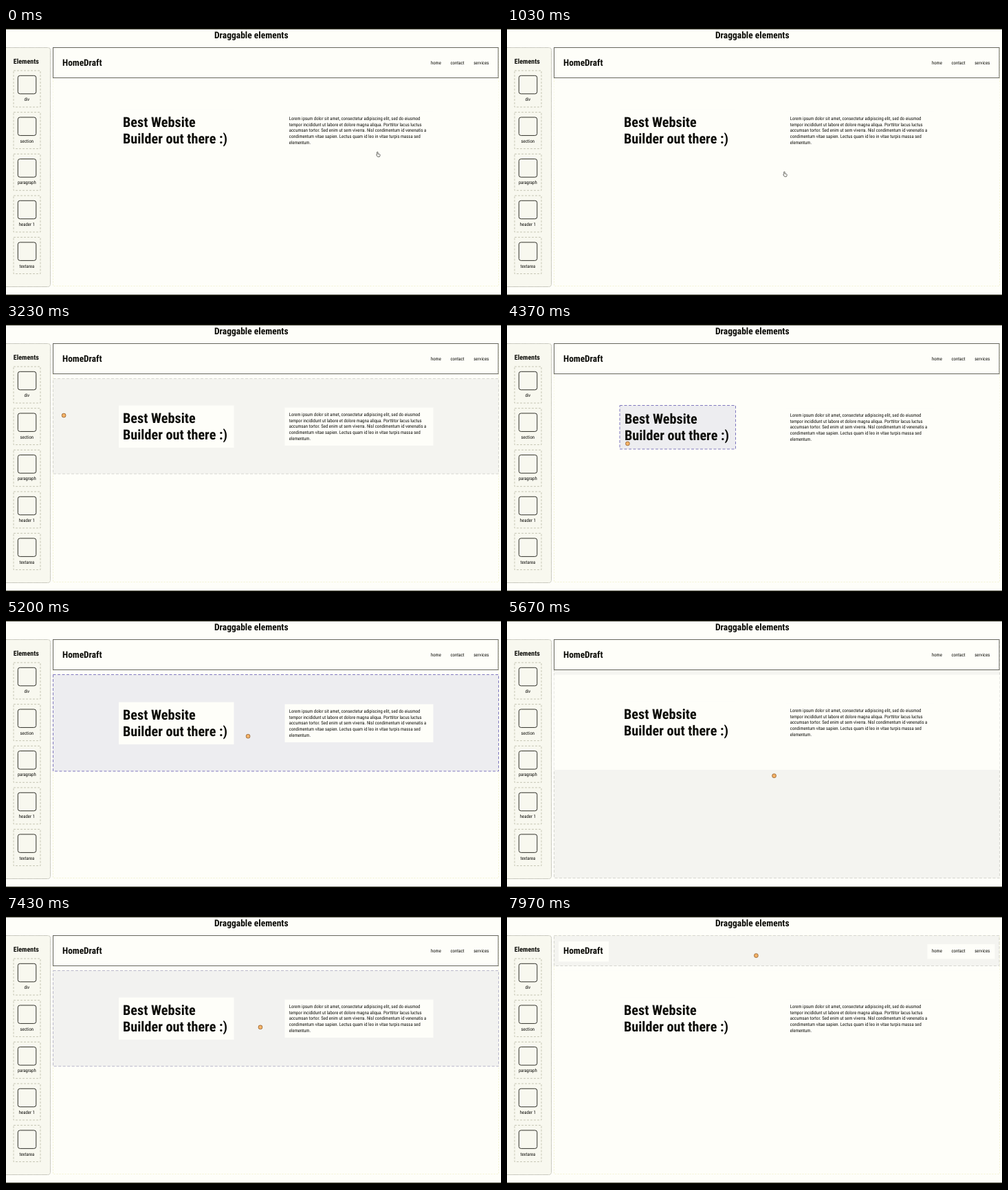
These frames come from a looping animation (720x390 px, 8 s). An HTML page:

```html
<!DOCTYPE html>
<html lang="en">
<head>
<meta charset="utf-8">
<title>Draggable elements</title>
<style>
html, body { margin: 0; width: 100%; height: 100%; overflow: hidden; }
svg { display: block; font: 6.72px "Roboto Condensed", Roboto, "Liberation Sans Narrow", sans-serif; font-stretch: 75%; }
text { fill: #0c0c08; text-rendering: geometricPrecision; }
.bold { font-weight: 700; }
.page { fill: #fefef9; }
</style>
</head>
<body>
<svg width="720" height="390" viewBox="0 0 720 390" fill="none">
  <rect class="page" width="720" height="390"/>
  <path d="M0 1H720M0 389H720" stroke="#1c1c10" stroke-width="2"/>
  <text class="bold" x="356.8" y="14.8" text-anchor="middle" font-size="13.5">Draggable elements</text>

  <path d="M0 28.5H60.5Q64.5 28.5 64.5 32.5V372.5Q64.5 376.5 60.5 376.5H0" fill="#f8f8ef" stroke="#b4b4a8" stroke-dasharray="1.5 .7"/>
  <text class="bold" x="10.8" y="51.8" font-size="10">Elements</text>
  <g id="tiles"></g>

  <rect id="root" x="68.5" y="28.5" width="648" height="347"/>
  <rect id="header" x="68.5" y="28.5" width="647.5" height="44"/>
  <rect class="page" x="75" y="37" width="73" height="29.5"/>
  <rect class="page" x="611.5" y="41" width="98" height="21.5"/>
  <text class="bold" x="82" y="55.3" font-size="13.33">HomeDraft</text>
  <text x="618" y="53">home</text>
  <text x="646.5" y="53">contact</text>
  <text x="680.3" y="53">services</text>

  <rect id="section" x="68.5" y="79.5" width="648" height="138.5"/>
  <rect id="h1" x="164" y="118.5" width="167.5" height="61.5"/>
  <g id="heading" class="bold" font-size="20.2">
    <text x="170" y="144">Best Website</text>
    <text x="170" y="168">Builder out there :)</text>
  </g>
  <rect id="par" x="405.5" y="121.5" width="216" height="55.5"/>
  <g id="copy"></g>
  <path id="hand" d="M-1.5-3.5Q-.7-4.3 0-3.5V-1L2.5-.4Q3.4 0 3 1.2L2.3 3.2H-.6L-2.4.6Q-2.3-.3-1.4.1Z" fill="#fefef9" stroke="#4a4a44" stroke-width=".8"/>
  <rect id="fist" x="-2.7" y="-2.7" width="5.4" height="5.4" rx="2" fill="#f8b468" stroke="#94602c" stroke-width=".9"/>
</svg>
<script>
const LOOP = 8000, DRAG_START = 2300;
const $ = id => document.getElementById(id);
const put = (el, attrs) => { for (const k in attrs) el.setAttribute(k, attrs[k]); };
const shift = (id, x, y) => put($(id), { transform: `translate(${x} ${y})` });
const mix = (a, b, k) => `rgb(${a.map((v, i) => v + (b[i] - v) * k)})`;

$("tiles").innerHTML = ["div", "section", "paragraph", "header 1", "textarea"].map((name, i) => `
  <g transform="translate(0 ${i * 60.65})">
    <rect x="11" y="62" width="39" height="53" stroke="#c6c6b4" stroke-dasharray="3 2"/>
    <rect x="17.3" y="69.3" width="26.5" height="26.5" rx="3" stroke="#33332c"/>
    <text x="30.3" y="106" text-anchor="middle">${name}</text>
  </g>`).join("");

$("copy").innerHTML = [
  "Lorem ipsum dolor sit amet, consectetur adipiscing elit, sed do eiusmod",
  "tempor incididunt ut labore et dolore magna aliqua. Porttitor lacus luctus",
  "accumsan tortor. Sed enim ut sem viverra. Nisl condimentum id venenatis a",
  "condimentum vitae sapien. Lectus quam id leo in vitae turpis massa sed",
  "elementum."
].map((line, i) => `<text x="411.8" y="${134.2 + i * 8.6}">${line}</text>`).join("");

// Pointer stops: time, x, y
const stops = [
  [0, 541, 184], [600, 586, 280], [1700, 122, 109], [2030, 37, 94], [2400, 30, 93],
  [3230, 84, 133], [3900, 164, 155], [4370, 175, 174], [4700, 320, 195], [5200, 352, 169],
  [5600, 382, 236], [6120, 430, 168], [6470, 401, 180], [7000, 376, 245], [LOOP, 362, 52]
];

function pointerAt(t) {
  const i = stops.findIndex(s => s[0] > t);
  const [t0, x0, y0] = stops[i - 1], [t1, x1, y1] = stops[i];
  const k = (t - t0) / (t1 - t0);
  return [x0 + (x1 - x0) * k, y0 + (y1 - y0) * k];
}

const boxes = ["root", "header", "section", "h1", "par"].map(id => {
  const el = $(id), { x, y, width: w, height: h } = el.getBBox();
  return { id, el, x, y, w, h };
});

// Innermost box under the dragged element
function targetAt(t) {
  if (t < DRAG_START) return "";
  const [px, py] = pointerAt(t);
  const hit = boxes.findLast(b => px > b.x && px < b.x + b.w && py > b.y && py < b.y + b.h);
  return hit ? hit.id : "";
}

// How far the highlight has faded in since the pointer entered
function fadeAt(t, target) {
  let age = 0;
  while (age < 400 && targetAt(t - age) === target) age += 10;
  return Math.max(0, (age - 250) / 150);
}

function restStyle(id) {
  const stroke = { header: "#66665e", root: "#f3f3d2" }[id] || "none";
  return { fill: "#fefef9", stroke, "stroke-dasharray": id === "root" ? "2 2" : "none" };
}

function draw(t) {
  const target = targetAt(t);
  const k = target ? fadeAt(t, target) : 0;

  for (const { id, el, w, h } of boxes) {
    const on = id === target;
    put(el, on ? {
      fill: mix([244, 244, 240], [237, 237, 240], k),
      stroke: mix([214, 214, 208], [128, 120, 190], k),
      "stroke-dasharray": "4 2.5"
    } : restStyle(id));
    const inner = id === "section" || id === "h1" || id === "par";
    put(el, { width: w + (on && id === "h1" ? k : 0), height: h + (on && inner ? 2 * k : 0) });
  }

  // A growing border pushes the content of the section down
  const down = name => target === name ? Math.round(k) : 0;
  const section = down("section"), h1 = down("h1"), par = down("par");
  shift("heading", h1, section + h1);
  shift("copy", par, section + h1 + par);
  shift("h1", 0, section);
  shift("par", 0, section + h1);

  const dragging = t >= DRAG_START;
  put($("hand"), { visibility: dragging ? "hidden" : "visible" });
  put($("fist"), { visibility: dragging ? "visible" : "hidden" });
  shift(dragging ? "fist" : "hand", ...pointerAt(t));
}

function frame() {
  draw(performance.now() % LOOP);
  requestAnimationFrame(frame);
}
frame();
</script>
</body>
</html>
```
